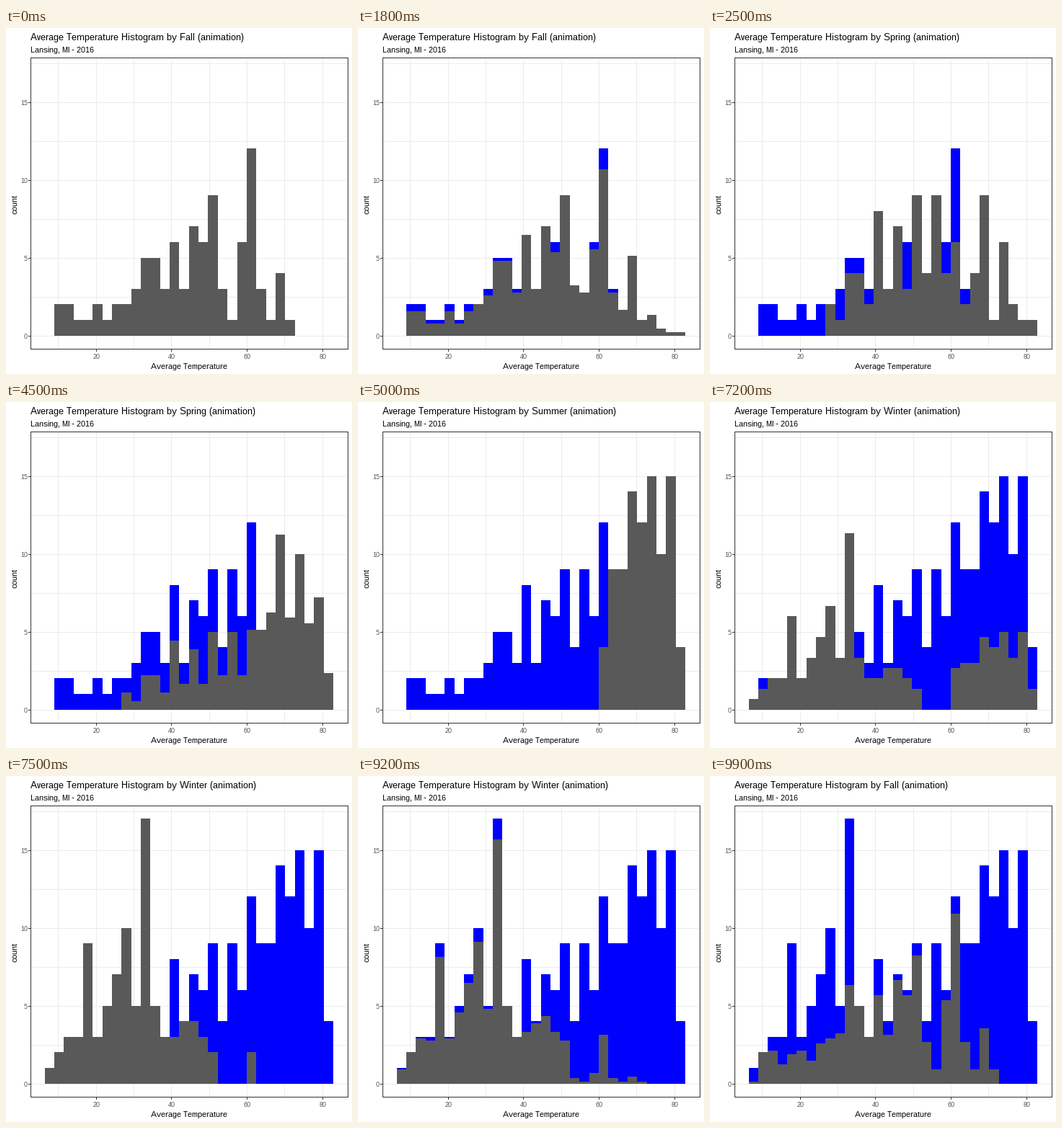
Animation of 480 by 480 pixels, one loop 10 s. Source, as a matplotlib script:

```python
import numpy as np
import matplotlib.pyplot as plt
from matplotlib.animation import FuncAnimation
from matplotlib.patches import Rectangle

plt.rcParams.update({
    "font.family": "Liberation Sans",
    "text.hinting": "native",
    "text.hinting_factor": 1,
    "text.kerning_factor": 6,
})

SIZE, DPI = 480, 80
BAR, SHADOW, GRID, EDGE, LABEL = "#595959", "#0000FF", "#EBEBEB", "#333333", "#4D4D4D"
LEFT, RIGHT, TOP, BOTTOM = 34, 474, 41, 445
BASE, UNIT = 427, 21.6

# Days per temperature bin, 30 bins from coldest to warmest
SEASONS = ["Fall", "Spring", "Summer", "Winter"]
COUNTS = np.zeros((4, 30))
COUNTS[0, 1:26] = [2, 2, 1, 1, 2, 1, 2, 2, 3, 5, 5, 3, 6,
                   3, 7, 6, 9, 3, 1, 6, 12, 3, 1, 4, 1]
COUNTS[1, 8:30] = [2, 1, 4, 4, 2, 8, 3, 7, 3, 9, 4,
                   9, 4, 6, 2, 4, 9, 1, 6, 2, 1, 1]
COUNTS[2, 21:30] = [4, 9, 9, 14, 12, 15, 10, 15, 4]
COUNTS[3, :18] = [1, 2, 3, 3, 9, 3, 5, 7, 10, 5, 17, 5, 3, 3, 4, 4, 3, 2]
COUNTS[3, 21] = 2

HOLD, STEPS = 16, 9
PERIOD = HOLD + STEPS
FRAMES = PERIOD * len(SEASONS)

fig = plt.figure(figsize=(SIZE / DPI, SIZE / DPI), dpi=DPI, facecolor="white")
ax = fig.add_axes([0, 0, 1, 1])
ax.set_xlim(0, SIZE)
ax.set_ylim(SIZE, 0)
ax.axis("off")


def box(x, y, w, h, color, z):
    return ax.add_patch(Rectangle((x, y), w, h, facecolor=color, linewidth=0,
                                  antialiased=False, zorder=z))


def write(x, y, text, px, color="black", **kw):
    return ax.text(x, y, text, fontsize=px * 72 / DPI, color=color,
                   va="baseline", zorder=6, **kw)


def x_pixel(temp):
    return int(125.01 + (temp - 20) * 314 / 60)


def y_pixel(count):
    return int(BASE - UNIT * count + 1e-6)


# Grid, ticks and tick labels
for temp in range(10, 90, 10):
    x = x_pixel(temp)
    box(x, TOP, 1, BOTTOM - TOP, GRID, 1)
    if temp % 20 == 0:
        box(x, BOTTOM, 1, 4, EDGE, 4)
        write(x + 0.5, 459, str(temp), 9, LABEL, ha="center")
for half in range(8):
    y = y_pixel(2.5 * half)
    box(LEFT, y, RIGHT - LEFT, 1, GRID, 1)
    if half % 2 == 0:
        box(LEFT - 3, y, 3, 1, EDGE, 4)
        write(30, y + 4, str(5 * half // 2), 9, LABEL, ha="right")

# Panel border
for y in (TOP, BOTTOM):
    box(LEFT, y, RIGHT - LEFT + 1, 1, EDGE, 5)
for x in (LEFT, RIGHT):
    box(x, TOP, 1, BOTTOM - TOP + 1, EDGE, 5)

title = write(34, 17, "", 13)
write(34, 34, "Lansing, MI - 2016", 11)
write(254, 473, "Average Temperature", 11, ha="center")
ax.text(15, 244, "count", fontsize=11 * 72 / DPI, rotation=90,
        rotation_mode="anchor", ha="center", va="baseline", zorder=6)

edges = np.floor(54.2 + 13.34 * np.arange(31)).astype(int)


def make_bars(color, z):
    return [box(a, BASE, b - a, 0, color, z) for a, b in zip(edges, edges[1:])]


shadows = make_bars(SHADOW, 2)
bars = make_bars(BAR, 3)


def set_heights(rects, counts):
    for rect, count in zip(rects, counts):
        y = y_pixel(count)
        rect.set_y(y)
        rect.set_height(BASE - y)


def update(frame):
    season, step = divmod(frame, PERIOD)
    t = max(0, step - HOLD) / STEPS
    following = (season + 1) % len(SEASONS)
    set_heights(bars, (1 - t) * COUNTS[season] + t * COUNTS[following])
    # Seasons already reached stay behind as a blue outline
    set_heights(shadows, COUNTS[:season + 1].max(axis=0))
    name = SEASONS[following if t > 0.5 else season]
    title.set_text(f"Average Temperature Histogram by {name} (animation)")
    return [*shadows, *bars, title]


anim = FuncAnimation(fig, update, frames=FRAMES, interval=100, repeat=True,
                     repeat_delay=0, init_func=lambda: update(0), blit=False)

plt.show()
```
